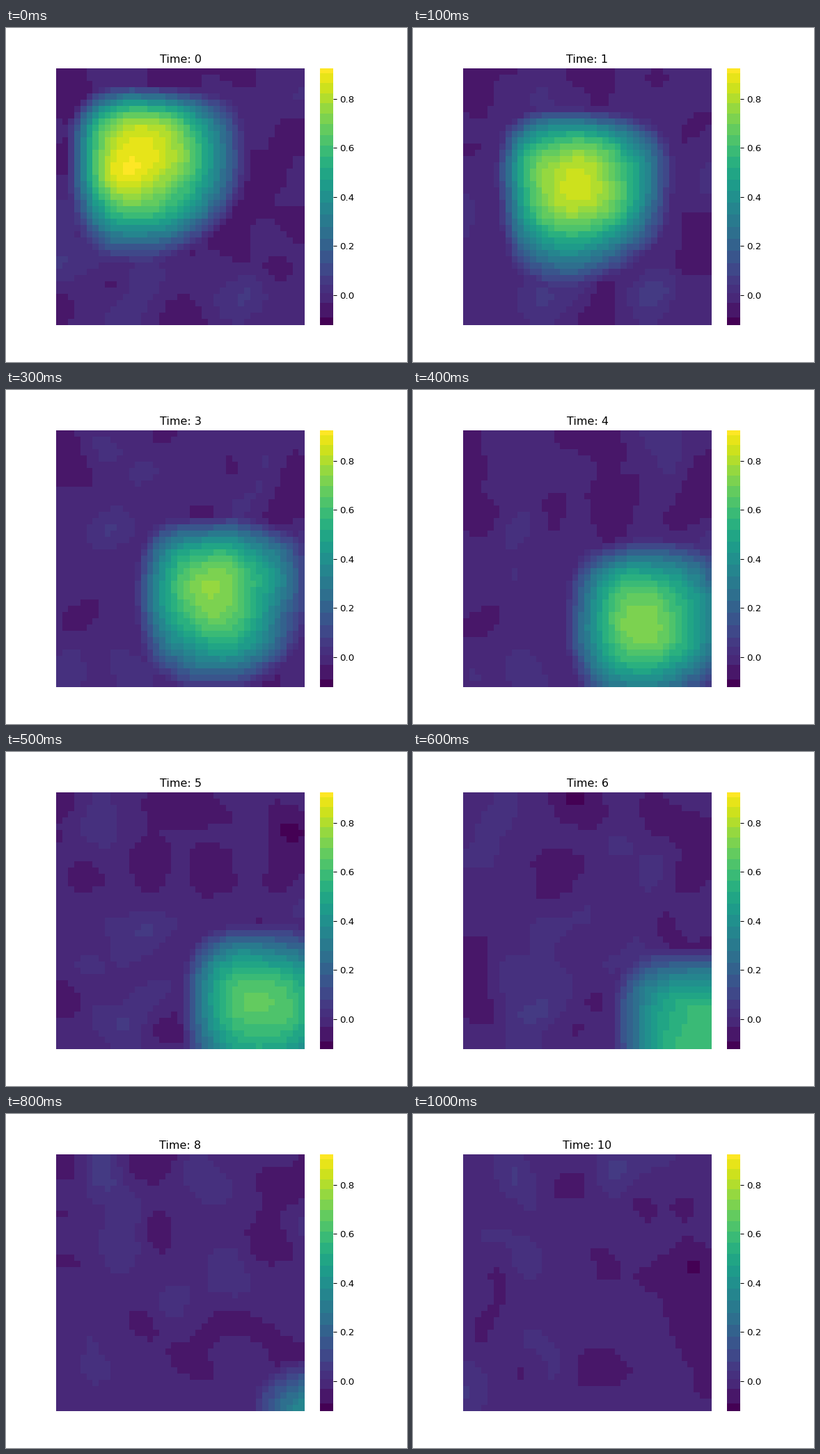
Animation, 576 px wide and 480 px high, one loop 1100 ms. Source, as a matplotlib script:

```python
import matplotlib.pyplot as plt
import numpy as np
from matplotlib.animation import FuncAnimation
from matplotlib.colors import ListedColormap

N, STEPS = 41, 11
VMIN, VMAX = -0.1234, 0.9251

rng = np.random.default_rng(7)
i = np.arange(N)
x, y = np.meshgrid(i, i)

# Gaussian smoothing matrix, scaled to keep the noise at unit variance
blur = np.exp(-((i[:, None] - i) / 3.2) ** 2)
blur /= np.sqrt((blur ** 2).sum(axis=1, keepdims=True))


def bump(t):
    """Peak sliding down the diagonal, steep and square at its upper left."""
    dx, dy = x - 13.6 - 4.15 * t, y - 12.9 - 4.27 * t
    left, top = dx < 0, dy < 0
    far = max(14, 18 - 0.6 * t)
    u = (abs(dx) / np.where(left, 12.6 + 0.4 * t, far)) ** np.where(left, 2.6, 2)
    v = (abs(dy) / np.where(top, 11 + 0.6 * t, far)) ** np.where(top, 2.6, 2)
    q = u + v - np.where(left | top, 0.4, 0) * np.minimum(u * v, 1)
    return 0.93 * np.exp(-0.07 * t) * np.clip(1 - q, 0, None) ** 1.3


def cooling(t):
    """Right side slowly darkens as the peak leaves."""
    return -0.04 * (t / STEPS) ** 2 * np.exp(-((x - 37) / 6) ** 2 - ((y - 22) / 14) ** 2)


def smooth_noise():
    return blur @ rng.normal(size=(N, N)) @ blur.T


fields, drift = [], smooth_noise()
for t in range(STEPS):
    fields.append(bump(t) + cooling(t) - 0.012 + 0.022 * drift)
    drift = 0.6 * drift + 0.8 * smooth_noise()

# Stepped viridis: finer steps toward the bright end
s = np.linspace(0, 1, 19)
tones = np.r_[0, 0.06, 0.11, 0.14, 0.17, 0.215 + 0.785 * s * (1.13 - 0.13 * s)]
edges = (tones[1:] + tones[:-1]) / 2
cmap = ListedColormap(plt.get_cmap("viridis")(tones[np.digitize(np.linspace(0, 1, 512), edges)]))

plt.rcParams["font.family"] = "DejaVu Sans"
fig, ax = plt.subplots(figsize=(6, 5), dpi=96)
mesh = ax.pcolormesh(fields[0], cmap=cmap, vmin=VMIN, vmax=VMAX)
ax.invert_yaxis()
ax.axis("off")
bar = fig.colorbar(mesh, ax=ax)
bar.outline.set_linewidth(0)
title = ax.set_title("Time: 0")


def update(t):
    mesh.set_array(fields[t])
    title.set_text(f"Time: {t}")
    return mesh, title


anim = FuncAnimation(fig, update, frames=STEPS, interval=100, repeat=True, repeat_delay=0)
plt.show()
```
